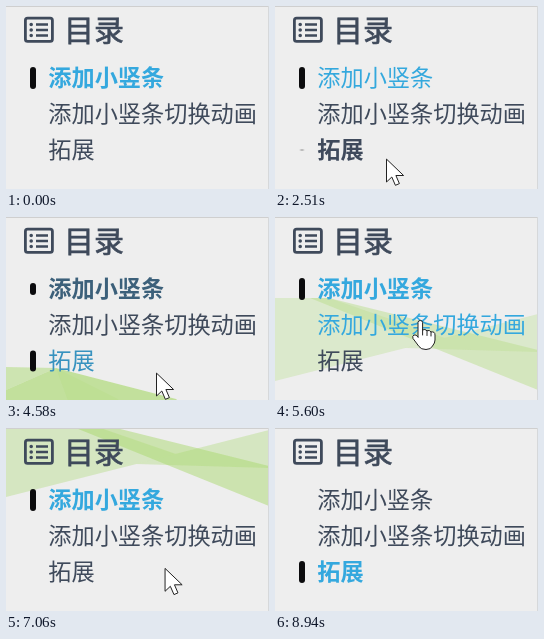
Recreate the animation shown at these times as an HTML page. Size 263x183 px, loop 9670 ms.

```html
<!DOCTYPE html>
<html lang="zh-CN">
<head>
<meta charset="utf-8">
<title>目录</title>
<style>
  html, body { margin: 0; width: 100%; height: 100%; overflow: hidden; background: #eee; }
  svg { display: block; width: 263px; height: 183px; }
  text { font-family: "Noto Sans CJK SC", "Noto Sans CJK", "Noto Sans", sans-serif; }
  .title { font-size: 30px; font-weight: 500; fill: #3f4a5b; stroke: #3f4a5b; stroke-width: .7; }
  .item { font-size: 23.2px; }
  .cursor path { fill: #fff; stroke: #222; stroke-width: 1; stroke-linejoin: round; stroke-linecap: round; }
</style>
</head>
<body>
<svg viewBox="0 0 263 183">
  <rect width="263" height="183" fill="#eee"/>

  <g class="ribbon" fill="#7ed79c">
    <path d="M0 115L175 130L0 135Z" opacity=".6"/>
    <path d="M0 135L110 126L263 139L160 132Z" opacity=".4"/>
    <path d="M110 130L263 119V139Z" opacity=".6"/>
  </g>
  <g class="ribbon" fill="#a5d867">
    <path d="M0 151L50 152L0 174Z" opacity=".45"/>
    <path d="M50 152L170 183L263 260H0V174Z" opacity=".6"/>
    <path d="M50 152L112 183L150 260H90Z" opacity=".15"/>
  </g>
  <g class="ribbon" fill="#a5d867">
    <path d="M0 -14H54L170 26L0 69Z" opacity=".36"/>
    <path d="M35 -14H54L263 38V78Z" opacity=".5"/>
    <path d="M130 36L263 2V40Z" opacity=".36"/>
  </g>

  <rect width="263" height="1" fill="#cfcfcf"/>
  <rect x="262" width="1" height="183" fill="#d6d8da"/>

  <g fill="none" stroke="#3f4a5b" stroke-width="2.8">
    <rect x="19.4" y="12.2" width="27" height="23.2" rx="2.2"/>
    <path d="M30 18.5H42M30 24H42M30 29.5H42" stroke-width="2.4"/>
    <path d="M25.2 18.5h0M25.2 24h0M25.2 29.5h0" stroke-width="3.6" stroke-linecap="round"/>
  </g>
  <text class="title" x="58" y="34.5">目录</text>

  <g id="menu"></g>

  <g class="cursor" id="arrow">
    <path d="M.5 .5V23L5.8 18L9.4 26.3L13.4 24.6L9.9 16.5H17.2Z"/>
  </g>
  <g class="cursor" id="hand">
    <path d="M-2 17V2.5Q-2 .5 .3 .5T2.6 2.5V10Q5 8.5 7 10.8Q9.5 9.5 11 12Q15 11.2 15 15V20Q15 23 12.5 26Q11 29.5 6 29.5Q1 29.5 -1 26.5L-7 18.5Q-8 16 -6 15T-2 17Z"/>
    <path d="M2.6 10V15M7 11V15.5M11 12V16" fill="none"/>
  </g>
</svg>
<script>
const LOOP = 9670;
const BAR = 22;
const FONT = 23.2;
const LEFT = 42.3;
const SWITCH_TIME = 260;
const HOVER_TIME = 180;
const DARK = [63, 74, 91];
const BLUE = [52, 168, 222];

const rows = ['添加小竖条', '添加小竖条切换动画', '拓展']
  .map((label, i) => ({ label, y: 72 + 36 * i }));

const switches = [
  { at: 0, row: 0 }, { at: 2510, row: 2 }, { at: 4520, row: 0 },
  { at: 7150, row: 1 }, { at: 8000, row: 2 }
];

// Ribbons fade in and out, and follow the page while it scrolls.
const ribbons = [
  { start: 300, end: 2200, scroll: 1280, time: 470, from: 0, to: -77 },
  { start: 4150, end: 4850, scroll: 4180, time: 580, from: -147, to: 42 },
  { start: 5000, end: 7850, scroll: 5960, time: 130, from: 95, to: 0 }
];

// Pointer moves; it rests in between.
const entry = { x: 118, y: 186 };
const moves = [
  { at: 250, time: 650, x: 78, y: 146 },
  { at: 1850, time: 400, x: 111, y: 153 },
  { at: 3240, time: 470, x: 97, y: 61 },
  { at: 3910, time: 70, x: 88, y: 55 },
  { at: 4180, time: 330, x: 150, y: 156 },
  { at: 4990, time: 450, x: 145, y: 103 },
  { at: 5980, time: 100, x: 158, y: 140 },
  { at: 6990, time: 800, x: 183, y: 153 },
  { at: 8730, time: 210, x: 200, y: 184 }
];

const $ = id => document.getElementById(id);
const clamp = v => Math.max(0, Math.min(1, v));
const mix = (a, b, p) => a + (b - a) * p;
const ease = p => p * p * (3 - 2 * p);
const progress = (t, at, time) => clamp((t - at) / time);

function pointer(t) {
  return moves.reduce((pos, move) => {
    const p = ease(progress(t, move.at, move.time));
    return { x: mix(pos.x, move.x, p), y: mix(pos.y, move.y, p) };
  }, entry);
}

function isOver(row, { x, y }) {
  return Math.abs(y - row.y) < 17 && x > LEFT && x < LEFT + row.label.length * FONT;
}

// Share of the recent past that the pointer spent on the row.
function hover(row, t) {
  const steps = 12;
  let hits = 0;
  for (let i = 0; i < steps; i++) hits += isOver(row, pointer(t - HOVER_TIME * i / steps));
  return hits / steps;
}

function add(tag, attrs, text = '') {
  const el = document.createElementNS('http://www.w3.org/2000/svg', tag);
  for (const key in attrs) el.setAttribute(key, attrs[key]);
  el.textContent = text;
  return $('menu').appendChild(el);
}

rows.forEach(row => {
  row.bar = add('rect', { x: 24, width: 6, rx: 3, fill: '#0b0b0d' });
  row.text = add('text', { class: 'item', x: LEFT, y: row.y + 8 }, row.label);
});
const ribbonEls = document.querySelectorAll('.ribbon');

function drawRibbon(el, { start, end, scroll, time, from, to }, t) {
  const fade = .3 * (end - start);
  const y = mix(from, to, ease(progress(t, scroll, time)));
  el.setAttribute('transform', `translate(0 ${y})`);
  el.setAttribute('opacity', clamp((t - start) / fade) * clamp((end - t) / fade));
}

function drawMenu(t) {
  const [current, previous] = switches.filter(s => s.at <= t).reverse();
  const p = previous ? progress(t, current.at, SWITCH_TIME) : 1;

  rows.forEach((row, i) => {
    const active = i === current.row;
    const leaving = previous && i === previous.row;
    const tint = active ? p : leaving ? 1 - p : 0;
    const size = BAR * (active ? 1 - (1 - p) ** 3 : leaving ? 1 - p ** 2 : 0);
    const blue = Math.max(tint, hover(row, t));
    const color = DARK.map((c, k) => Math.round(mix(c, BLUE[k], blue)));
    row.text.setAttribute('fill', `rgb(${color})`);
    row.text.setAttribute('font-weight', active ? 700 : 400);
    row.bar.setAttribute('y', row.y - size / 2);
    row.bar.setAttribute('height', size);
  });
}

function drawCursor(t) {
  const pos = pointer(t);
  const visible = t >= 250 && t < 8940;
  const over = rows.some(row => isOver(row, pos));
  const show = (el, on) => {
    el.setAttribute('visibility', on ? 'visible' : 'hidden');
    el.setAttribute('transform', `translate(${pos.x} ${pos.y})`);
  };
  show($('arrow'), visible && !over);
  show($('hand'), visible && over);
}

function draw(t) {
  ribbons.forEach((ribbon, i) => drawRibbon(ribbonEls[i], ribbon, t));
  drawMenu(t);
  drawCursor(t);
}

const begin = performance.now();
function frame() {
  draw((performance.now() - begin) % LOOP);
  requestAnimationFrame(frame);
}
frame();
</script>
</body>
</html>
```
